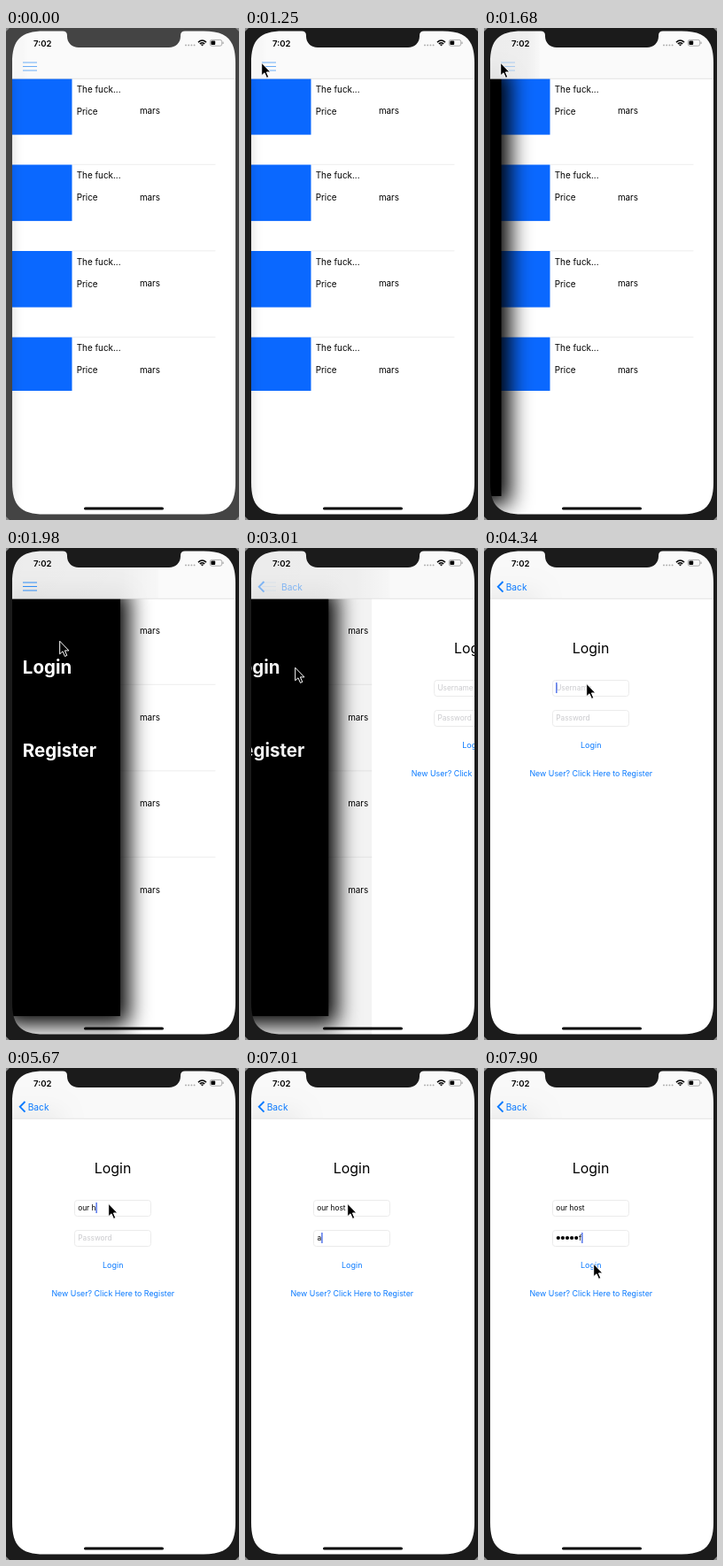
Write an HTML page that moves like this. It is 263 px wide and 556 px high and loops after 8 s.

```html
<!DOCTYPE html>
<html lang="en">
<head>
<meta charset="utf-8">
<title>Drawer menu and login</title>
<style>
html, body { margin: 0; width: 100%; height: 100%; overflow: hidden; background: #1b1b1b; }
svg { display: block; width: 100vw; height: 100vh; font-family: Inter, "Liberation Sans", sans-serif; }
.link { fill: #0a7aff; text-anchor: middle; }
.field { fill: #fff; stroke: #ebebeb; }
.hint { fill: #cbcbce; font-size: 8.3px; }
.entry { font-size: 8.3px; fill: #000; white-space: pre; }
</style>
</head>
<body>
<svg viewBox="0 0 263 556" preserveAspectRatio="none">
  <defs>
    <filter id="blur" x="-60%" y="-20%" width="220%" height="140%"><feGaussianBlur stdDeviation="12"/></filter>
    <linearGradient id="haze"><stop offset="0" stop-opacity=".055"/><stop offset=".75" stop-opacity=".045"/><stop offset="1" stop-opacity=".012"/></linearGradient>
  </defs>
  <g>
    <rect width="263" height="556" fill="#fff"/>
    <g id="home">
      <g id="rows"></g>
      <g id="drawer">
        <rect x="-132" y="47" width="142" height="492" filter="url(#blur)"/>
        <rect x="-122" y="57" width="122" height="472"/>
        <g fill="#fff" font-weight="700" font-size="20.5">
          <text x="-110.2" y="141.6">Login</text>
          <text x="-110.2" y="235.6">Register</text>
        </g>
      </g>
      <rect id="dim" x="-80" width="420" height="556" opacity="0"/>
    </g>
    <g id="login">
      <rect x="7" y="57" width="252" height="500" fill="#fff"/>
      <text x="120.6" y="118.7" font-size="15.9" text-anchor="middle">Login</text>
      <rect class="field" x="77.5" y="149.5" width="86" height="18" rx="3"/>
      <rect class="field" x="77.5" y="183.5" width="86" height="18" rx="3"/>
      <text id="userHint" class="hint" x="81.2" y="161">Username</text>
      <text id="passHint" class="hint" x="81.2" y="195">Password</text>
      <text id="user" class="entry" x="81.2" y="161"></text>
      <g id="dots"></g>
      <text id="last" class="entry" y="195"></text>
      <rect id="caret" width="1.3" height="12" fill="#3d62e8"/>
      <text class="link" x="120.8" y="226.3" font-size="9">Login</text>
      <text class="link" x="120.8" y="257.8" font-size="8.85">New User? Click Here to Register</text>
    </g>
    <rect x="7" y="0" width="252" height="57" fill="#fafafa" opacity=".95"/>
    <rect id="tint" x="7" y="3" height="54" fill="url(#haze)"/>
    <path d="M7 57.3H259" stroke="#dcdcdc" stroke-width=".8"/>
    <path id="menu" d="M19 39H35M19 43.5H35M19 48H35" stroke="#2f8df5" stroke-width="1"/>
    <g id="back">
      <path d="M21.5 38L15.8 43.8L21.5 49.6" fill="none" stroke="#0a7aff" stroke-width="1.9"/>
      <text id="backText" y="47.5" font-size="10.2" fill="#0a7aff">Back</text>
    </g>
    <text x="31" y="20.6" font-size="9.6" font-weight="600">7:02</text>
    <path d="M203 19.4H213" stroke="#aaa" stroke-width="1.9" stroke-linecap="round" stroke-dasharray="0 3.2"/>
    <g fill="none" stroke="#000" stroke-width="1.5">
      <path d="M217 16.1Q221.5 11.8 226 16.1M218.8 18Q221.5 15.5 224.2 18"/>
      <path d="M220.3 18.7H222.7L221.5 20.2Z" fill="#000" stroke-width=".5"/>
    </g>
    <rect x="230.3" y="13.4" width="13.4" height="6.8" rx="2" fill="none" stroke="#999" stroke-width=".8"/>
    <rect x="231.4" y="14.5" width="4.8" height="4.6" rx="1"/>
    <path d="M245 15.6V18" stroke="#999"/>
    <rect x="88" y="541.4" width="90" height="3.2" rx="1.6"/>
  </g>
  <path id="bezel" fill-rule="evenodd" d="M0 0H263V556H0ZM43 3.5H64Q69 3.5 69 8.5V9.5C69 16.5 74.5 22 82 22H184C191.5 22 197 16.5 197 9.5V8.5Q197 3.5 202 3.5H223C249.3 3.5 259 13.2 259 39.5V513.5C259 539.8 249.3 549.5 223 549.5H43C16.7 549.5 7 539.8 7 513.5V39.5C7 13.2 16.7 3.5 43 3.5Z"/>
  <path d="M0 0H4L0 4ZM263 0V4L259 0ZM0 556V552L4 556ZM263 556H259L263 552Z" fill="#888"/>
  <path id="cursor" d="M.7 .2v14.6l3.3-3l2.5 5.6l2.3-1l-2.4-5.5h4.6Z" stroke="#fff" stroke-width="1"/>
</svg>
<script>
const $ = id => document.getElementById(id);
const LOOP = 8000, START = 500, STEP = 147.73;
const USER = "our host", PASS = "asdasf";
const WIDTH = 252;

// list rows
let rows = "";
for (let i = 0; i < 4; i++) {
  const y = 57 + 97.5 * i;
  rows += `<rect x="7" y="${y}" width="67.5" height="${i < 3 ? 63.6 : 60.5}" fill="#0a68ff"/>` +
    `<g font-size="9.9"><text x="79.7" y="${y + 15.7}">The fuck...</text>` +
    `<text x="79.7" y="${y + 40.8}">Price</text><text x="150.9" y="${y + 40}">mars</text></g>`;
  if (i) rows += `<path d="M75 ${y - .2}H236.5" stroke="#e9e9e9" stroke-width=".8"/>`;
}
$("rows").innerHTML = rows;

// pointer path: time, x, y
const path = [
  [500, 70, 210], [940, 22, 50], [1090, 18, 39], [1685, 18, 39], [1977, 60, 105],
  [2120, 58, 118], [2275, 58, 118], [2568, 56, 135], [3460, 56, 135],
  [3602, 74, 154], [3750, 104, 164], [3895, 115, 153],
  [7445, 115, 153], [7592, 118, 205], [7740, 122, 258], [7880, 123, 221]
];
// step number, characters typed
const userKeys = [[30, 1], [31, 2], [32, 3], [33, 4], [35, 5], [36, 6], [38, 8]];
const passKeys = [[44, 1], [45, 3], [46, 4], [47, 6]];

const move = (el, x, y = 0) => el.setAttribute("transform", `translate(${x.toFixed(2)} ${y.toFixed(2)})`);
const show = (el, on) => el.setAttribute("visibility", on ? "visible" : "hidden");
const clamp = v => Math.min(1, Math.max(0, v));
const typed = (keys, n) => keys.reduce((c, k) => n >= k[0] ? k[1] : c, 0);

function along(t) {
  let a = path[0];
  for (const b of path) {
    if (t < b[0]) {
      const k = clamp((t - a[0]) / (b[0] - a[0]));
      return [a[1] + (b[1] - a[1]) * k, a[2] + (b[2] - a[2]) * k];
    }
    a = b;
  }
  return [a[1], a[2]];
}

function drawerEdge(t) {
  const k = clamp((t - 1570) / 310);
  const p = k < .5 ? 2 * k * k : 1 - 2 * (1 - k) * (1 - k);
  return -19 + 148 * p;
}

// critically damped push of the login page
function pushOffset(t) {
  const s = Math.max(0, t - 2892) * .013;
  const off = WIDTH * (1 + s) * Math.exp(-s);
  return off < 2 ? 0 : off;
}

function drawForm(n) {
  const u = typed(userKeys, n), p = typed(passKeys, n);
  $("user").textContent = USER.slice(0, u);
  show($("userHint"), !u);
  show($("passHint"), !p);
  let dots = "";
  for (let i = 0; i < p - 1; i++) dots += `<circle cx="${83.8 + 5.1 * i}" cy="192" r="2.1"/>`;
  $("dots").innerHTML = dots;
  const last = $("last"), x = 81.6 + 5.1 * Math.max(0, p - 1);
  last.textContent = p ? PASS[p - 1] : "";
  last.setAttribute("x", x);
  const caret = $("caret"), inPass = n >= 40;
  const end = inPass ? (p ? x + last.getComputedTextLength() : 81.2)
    : 81.2 + (u ? $("user").getComputedTextLength() : 0);
  caret.setAttribute("x", end);
  caret.setAttribute("y", inPass ? 186 : 152);
  show(caret, n >= 26);
}

function draw(time) {
  const n = Math.floor((time - START + 4) / STEP);
  const t = n < 0 ? 0 : START + n * STEP;
  const off = pushOffset(t), done = 1 - off / WIDTH;
  const edge = drawerEdge(t);

  move($("drawer"), edge);
  move($("home"), -.3 * (WIDTH - off));
  $("dim").setAttribute("opacity", .1 * done);
  move($("login"), off);
  show($("login"), done > 0);

  const hazeEnd = done > 0 ? Math.min(172, off + 27) : edge + 43;
  $("tint").setAttribute("width", Math.max(0, hazeEnd - 7));
  $("tint").setAttribute("opacity", off === 0 ? 0 : edge < 0 ? .25 : 1);

  const pressed = t > 1380 && t < 1820;
  $("menu").setAttribute("opacity", pressed ? .35 : clamp(1 - done * 2) * (t < 1820 ? .7 : 1));
  $("back").setAttribute("opacity", done);
  $("backText").setAttribute("x", 24.7 + off * .12);
  $("bezel").setAttribute("fill", n < 0 ? "#444" : "#1b1b1b");

  show($("cursor"), n >= 0);
  move($("cursor"), ...along(t));
  drawForm(n);
}

function tick() {
  draw(performance.now() % LOOP);
  requestAnimationFrame(tick);
}
tick();
</script>
</body>
</html>
```
